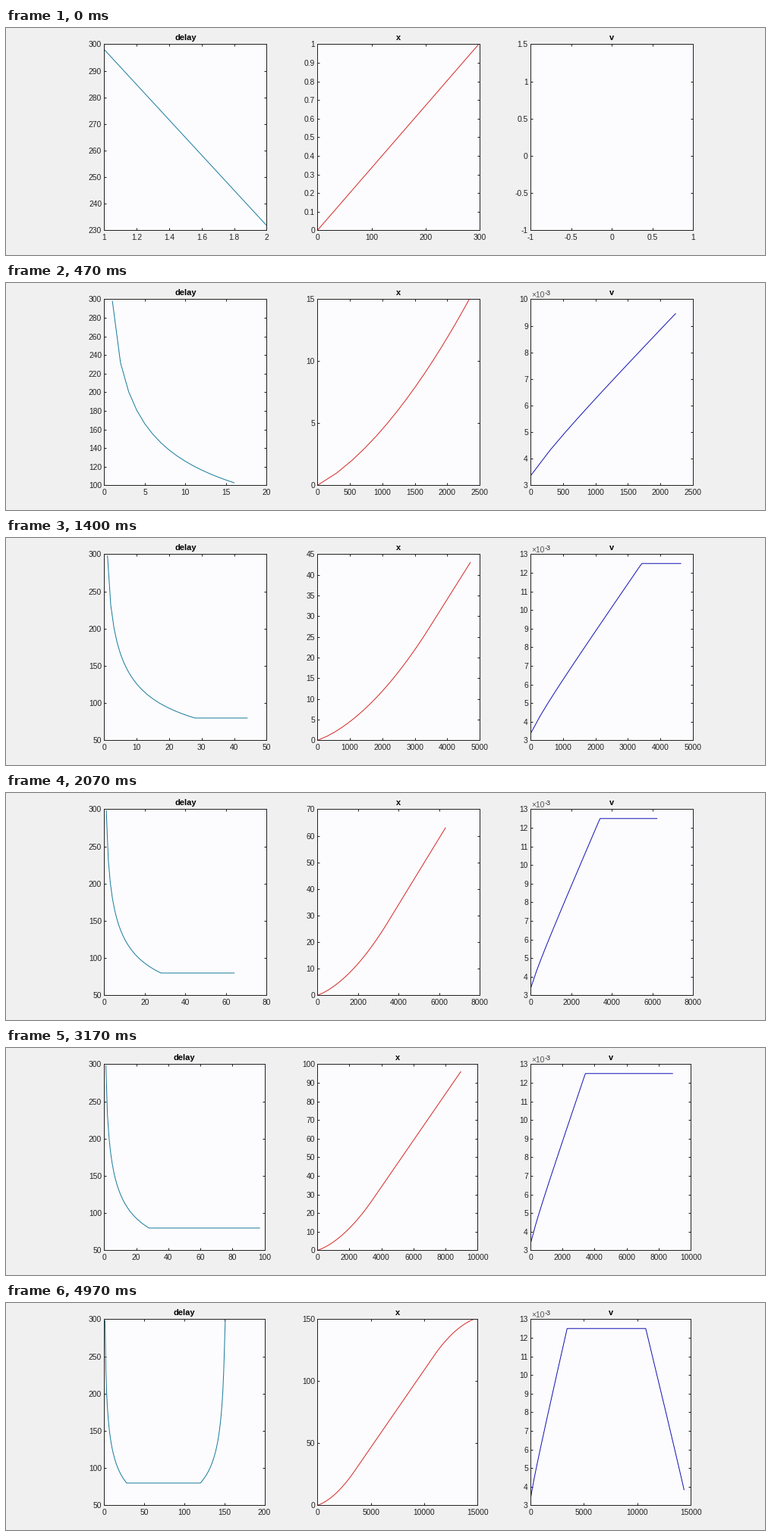
Write a matplotlib script that moves like this. It is 1000 by 300 pixels and loops after 5.01 s.

```python
import numpy as np
import matplotlib
import matplotlib.pyplot as plt
from matplotlib.animation import FuncAnimation

W, H, DPI = 1000, 300, 100
PX = 72 / DPI                      # points per pixel
STEPS, FRAMES, INTERVAL = 150, 167, 30
# just under half pixels, so that the box lines snap downwards
TOP, BOTTOM = 21.45, 267.45
LEFTS = [129.45 + 280.8 * i for i in range(3)]
INK, BACK, PANEL = "#222222", "#f0f0f0", "#fcfcfe"
NAMES = ("delay", "x", "v")
COLORS = ("#1a7c9c", "#d42a26", "#1414b4")

matplotlib.rcParams["font.family"] = "Liberation Sans"
matplotlib.rcParams["axes.unicode_minus"] = False


def motor_delays():
    """Step delays in ms: speed up, cruise at 80 ms, slow down."""
    k = np.arange(27)
    harmonic = np.concatenate([[0], np.cumsum(1 / np.arange(1, 27))])
    up = 1000 / np.sqrt((1000 / 298) ** 2 + 5.05 * k + 2.3 * harmonic)
    cruise = np.full(93, 80.0)
    down = 1000 / np.sqrt(12.5 ** 2 - 4.717 * np.arange(1, 31))
    return np.concatenate([up, cruise, down, [298.0]])


DELAY = motor_delays()
TIME = np.concatenate([[0], np.cumsum(DELAY)])
SPEED = 1000 / DELAY


def nice_ticks(lo, hi, most):
    """Tightest round limits with at most `most` intervals."""
    best = None
    for power in range(-1, 5):
        for m in (1, 2, 5):
            step = m * 10.0 ** power
            a = np.floor(lo / step + 1e-9)
            b = np.ceil(hi / step - 1e-9)
            if b - a <= most:
                key = (round((b - a) * step, 6), step, a, b)
                best = key if best is None else min(best, key)
    _, step, a, b = best
    return np.arange(a, b + 1) * step


fig = plt.figure(figsize=(W / DPI, H / DPI), dpi=DPI, facecolor=BACK)


def label(x, y, s, size, **kw):
    return fig.text(x / W, 1 - y / H, s, fontsize=size * PX, **kw)


axes, lines, titles = [], [], []
for name, color in zip(NAMES, COLORS):
    ax = fig.add_axes([0, 0, 0.1, 0.1], facecolor=PANEL, label=name)
    ax.tick_params(direction="in", top=True, right=True, length=2.6 * PX,
                   width=PX, color=INK, labelcolor=INK, labelsize=10.2 * PX)
    ax.tick_params(axis="x", pad=4.6 * PX)
    ax.tick_params(axis="y", pad=3.2 * PX)
    for spine in ax.spines.values():
        spine.set(linewidth=PX, color=INK)
    axes.append(ax)
    lines += ax.plot([], [], color=color, lw=PX, zorder=2)
    titles.append(label(0, 16, name, 11, weight="bold", color="black",
                        ha="center"))

power = [label(692, 19, "\u00d710", 10.2, color="#555555"),
         label(709.5, 16, "-3", 9, color=INK)]


def place(width):
    for ax, title, left in zip(axes, titles, LEFTS):
        ax.set_position([left / W, 1 - BOTTOM / H, width / W,
                         (BOTTOM - TOP) / H])
        title.set_x((left + width / 2) / W)


def set_axis(axis, set_lim, ticks):
    axis.set_ticks(ticks, [f"{round(t, 6) + 0:g}" for t in ticks])
    set_lim(ticks[0], ticks[-1])


def show(ax, line, x, y):
    line.set_data(x, y)
    if len(x) > 1:
        xt = nice_ticks(x.min(), x.max(), 5)
        yt = nice_ticks(y.min(), y.max(), 10)
    else:
        xt, yt = np.arange(-1, 1.1, 0.5), np.arange(-1, 1.6, 0.5)
    set_axis(ax.xaxis, ax.set_xlim, xt)
    set_axis(ax.yaxis, ax.set_ylim, yt)


def update(i):
    n = min(STEPS - 1, int(0.9 * i + 0.75)) + 2
    # wider time labels shrink all panels a little
    place(214 if TIME[n - 1] <= 8000 else 211.1)
    series = ((np.arange(1, n + 1), DELAY[:n]),
              (TIME[:n], np.arange(n)),
              (TIME[:n - 1], SPEED[:n - 1]))
    for ax, line, (x, y) in zip(axes, lines, series):
        show(ax, line, x, y)
    for part in power:
        part.set_visible(n > 2)
    return lines


def init():
    return update(0)


anim = FuncAnimation(fig, update, frames=FRAMES, init_func=init,
                     interval=INTERVAL, repeat=True, repeat_delay=0,
                     blit=False)
plt.show()
```
